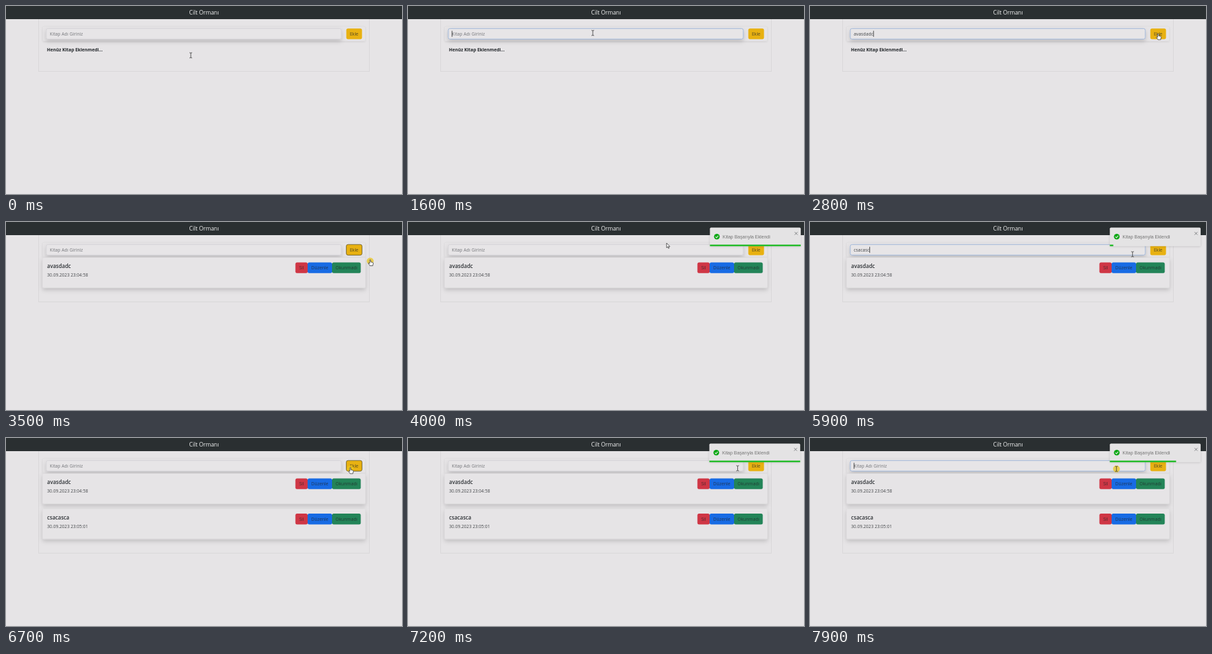
These frames come from a looping animation (600 by 286 pixels, 8000 ms). An HTML page:

```html
<!DOCTYPE html>
<html lang="tr">
<head>
<meta charset="utf-8">
<title>Cilt Ormanı</title>
<style>
  html, body { margin: 0; width: 100%; height: 100%; overflow: hidden; background: #e6e4e6; }
  svg { display: block; width: 600px; height: 286px; }
  text { font: 6.8px "Open Sans", "Noto Sans", sans-serif; fill: #45484b; white-space: pre; }
  .brand { font-size: 8.5px; fill: #f3f3f3; text-anchor: middle; }
  .bold { font-weight: 700; fill: #212529; }
  .name { font-size: 8px; font-weight: 600; fill: #2c3034; }
  .date { font-size: 6.65px; }
  .mid { text-anchor: middle; fill: #212529; fill-opacity: .75; }
  .hint { fill: #75777b; }
  .note { font: 7px "Liberation Sans", Arial, sans-serif; fill: #757575; }
  .frame { fill: none; stroke: #d9d7d9; }
  .panel { fill: #e6e4e6; stroke: #dad8db; stroke-width: .5; }
</style>
</head>
<body>
<svg viewBox="0 0 600 286">
  <defs>
    <filter id="deep" x="-10%" y="-60%" width="120%" height="260%">
      <feDropShadow dx="0" dy="3.4" stdDeviation="3" flood-color="#000" flood-opacity=".17"/>
    </filter>
    <filter id="soft" x="-10%" y="-40%" width="120%" height="190%">
      <feDropShadow dx="0" dy=".9" stdDeviation="1" flood-color="#000" flood-opacity=".09"/>
    </filter>
    <filter id="lift" x="-10%" y="-40%" width="120%" height="190%">
      <feDropShadow dx="0" dy=".5" stdDeviation="1.8" flood-color="#000" flood-opacity=".18"/>
    </filter>
  </defs>
  <rect width="600" height="286" fill="#e6e4e6"/>
  <rect id="box" class="frame" x="49.5" y="10.5" width="501" height="89"/>
  <rect width="600" height="20" fill="#2a2f31"/>
  <text class="brand" x="300" y="13.2">Cilt Ormanı</text>

  <rect class="panel" x="55.3" y="31" width="489.4" height="22.5" rx="2.5" filter="url(#soft)"/>
  <rect id="field" x="61" y="34.3" width="447" height="16" rx="2.6" fill="#e7e5e7" stroke-width=".8" filter="url(#deep)"/>
  <text id="hint" class="hint" x="66.3" y="45">Kitap Adı Giriniz</text>
  <text id="typed" x="66.3" y="45"></text>
  <path id="caret" d="M0 37.7v9.2" stroke="#222" stroke-width=".8"/>
  <rect id="add" x="515.6" y="34.2" width="23.8" height="16.2" rx="2.6" fill="#e8b111"/>
  <text class="mid" x="527.5" y="45">Ekle</text>

  <text id="empty" class="bold" x="62" y="68.6">Henüz Kitap Eklenmedi...</text>
  <g id="cards"></g>

  <g id="toast">
    <rect x="454.3" y="8.5" width="137.6" height="28.2" rx="1.8" fill="#e4e3e4" filter="url(#lift)"/>
    <circle cx="464.8" cy="22.3" r="4.3" fill="#0ca814"/>
    <path d="M462.7 22.4l1.6 1.6 2.7-3.2" fill="none" stroke="#eee" stroke-width="1.1"/>
    <text class="note" x="473.6" y="24.7">Kitap Başarıyla Eklendi</text>
    <path d="M582.7 15.2l4.4 4.4m0-4.4l-4.4 4.4" stroke="#77797b" stroke-width=".9"/>
    <rect id="bar" x="454.3" y="34.5" height="2.2" fill="#10b716"/>
  </g>

  <circle id="halo" r="5.2" fill="#e9c51f" fill-opacity=".75"/>
  <g id="mouse">
    <path id="beam" d="M-2-4Q0-4 0-3Q0-4 2-4M0-3V3M-2 4Q0 4 0 3Q0 4 2 4" fill="none" stroke="#333" stroke-width=".8"/>
    <path id="arrow" d="M0 0V7.2L1.7 5.7L2.8 8.2L3.9 7.7L2.8 5.3H5Z" fill="#fafafa" stroke="#222" stroke-width=".7"/>
    <path id="hand" d="M-.8.6Q0-.4.8.6V3.4L4 4.2Q4.8 4.5 4.6 5.6L3.9 9.2H-.4L-2.8 5.6Q-2.8 4.6-1.8 4.9L-.8 5.8Z" fill="#fafafa" stroke="#222" stroke-width=".7"/>
  </g>
</svg>
<script>
const LOOP = 8000, PX = 0.43;
const $ = id => document.getElementById(id);
const show = (el, on) => el.setAttribute('display', on ? 'inline' : 'none');
const set = (el, attrs) => { for (const k in attrs) el.setAttribute(k, attrs[k]); };
const clamp = v => Math.max(0, Math.min(1, v));
const mix = (a, b, p) => a + (b - a) * p;

function bezier(x1, y1, x2, y2) {
  const at = (a, b, s) => 3 * a * s * (1 - s) ** 2 + 3 * b * s * s * (1 - s) + s ** 3;
  return x => {
    let lo = 0, hi = 1;
    for (let i = 0; i < 24; i++) {
      const m = (lo + hi) / 2;
      if (at(x1, x2, m) < x) lo = m; else hi = m;
    }
    return at(y1, y2, (lo + hi) / 2);
  };
}
const bounce = bezier(.215, .61, .355, 1);
const ease = bezier(.25, .1, .25, 1);
const glide = bezier(.4, 0, .6, 1);

// Value along [position, value] stops, eased inside each segment.
function track(stops, p, curve) {
  const i = stops.findIndex(s => s[0] > p);
  if (i < 0) return stops[stops.length - 1][1];
  if (i === 0) return stops[0][1];
  const [a, b] = [stops[i - 1], stops[i]];
  return mix(a[1], b[1], curve((p - a[0]) / (b[0] - a[0])));
}

const books = [
  { name: 'avasdadc', date: '30.09.2023 23:04:58', at: 3385 },
  { name: 'csacasca', date: '30.09.2023 23:05:01', at: 6640 }
];
const actions = [
  ['Sil', 438.5, 18.5, '#cf3645'],
  ['Düzenle', 457, 37, '#186be4'],
  ['Okunmadı', 494, 43.5, '#238458']
];
const typing = [
  { from: 780, to: 3360, caret: 1600, start: 1900, text: 'avasdadc' },
  { from: 4400, to: 6610, caret: 4400, start: 5300, text: 'csacasca' },
  { from: 7860, to: LOOP, caret: 7860, start: LOOP, text: '' }
];
const toasts = [3515, 6770];
const clicks = [750, 3350, 4380, 6600, 7840];
const ENTER = 640, STAY = 1815, EXIT = 640;

// time, x, y, pointer shape
const path = [
  [0, 280, 75, 'beam'], [450, 280, 75, 'beam'], [780, 280, 41, 'beam'],
  [2150, 280, 41, 'beam'], [2400, 390, 58, 'arrow'], [2700, 527.5, 42, 'hand'],
  [3390, 527.5, 42, 'hand'], [3540, 556, 60, 'arrow'], [3750, 480, 52, 'arrow'],
  [4000, 391.8, 32, 'arrow'], [4250, 400, 42, 'beam'], [4750, 400, 42, 'beam'],
  [5050, 432, 60, 'arrow'], [5400, 452, 69, 'arrow'], [5700, 474, 61, 'arrow'],
  [5900, 488.7, 49, 'beam'], [6150, 506, 62, 'arrow'], [6400, 521.7, 45, 'hand'],
  [6900, 521.7, 45, 'hand'], [7150, 500, 46, 'beam'], [7750, 464.3, 47, 'beam'],
  [LOOP, 464.3, 47, 'beam']
];

$('cards').innerHTML = books.map((b, i) => `
  <g transform="translate(0 ${i * 53.6})">
    <rect class="panel" x="55.3" y="54" width="489.4" height="46" rx="2" filter="url(#deep)"/>
    <text class="name" x="62.3" y="70">${b.name}</text>
    <text class="date" x="62.3" y="83.2">${b.date}</text>
    ${actions.map(([label, x, w, color]) => `
      <rect x="${x}" y="61.5" width="${w}" height="16.3" rx="2.5" fill="${color}"/>
      <text class="mid" x="${x + w / 2}" y="72.2">${label}</text>`).join('')}
  </g>`).join('');
const cards = [...$('cards').children];

function drawField(t) {
  const turn = typing.find(s => t >= s.from && t < s.to);
  const count = turn ? Math.max(0, Math.floor((t - turn.start) / 100) + 1) : 0;
  const text = turn ? turn.text.slice(0, count) : '';
  $('typed').textContent = text;
  show($('hint'), !text);
  $('field').setAttribute('stroke', turn ? '#91aed8' : '#d2d1d5');
  let lit = turn && t >= turn.caret;
  if (lit && !count) lit = (t - turn.caret) % 1000 < 500;
  show($('caret'), lit);
  const end = text ? $('typed').getComputedTextLength() + .4 : .5;
  $('caret').setAttribute('transform', `translate(${66.3 + end} 0)`);
}

function drawToast(t) {
  const life = ENTER + STAY + EXIT;
  const start = toasts.find(s => t >= s && t < s + life);
  show($('toast'), start !== undefined);
  if (start === undefined) return;
  const age = t - start, out = (age - ENTER - STAY) / EXIT;
  let x, alpha;
  if (out < 0) {
    const p = age / ENTER;
    x = track([[0, 3000], [.6, -25], [.75, 10], [.9, -5], [1, 0]], p, bounce);
    alpha = track([[0, 0], [.6, 1]], p, bounce);
  } else {
    x = track([[0, 0], [.2, -20], [1, 2000]], out, ease);
    alpha = track([[.2, 1], [1, 0]], out, ease);
  }
  set($('toast'), { transform: `translate(${x * PX} 0)`, opacity: alpha });
  $('bar').setAttribute('width', 137.6 * (1 - clamp((age - ENTER) / STAY)));
}

function drawMouse(t) {
  const i = path.findIndex(k => k[0] > t), a = path[i - 1], b = path[i];
  const p = glide((t - a[0]) / (b[0] - a[0]));
  const x = mix(a[1], b[1], p), y = mix(a[2], b[2], p);
  $('mouse').setAttribute('transform', `translate(${x} ${y})`);
  for (const id of ['beam', 'arrow', 'hand']) show($(id), id === a[3]);
  set($('halo'), { cx: x, cy: y + (a[3] === 'beam' ? 0 : 2) });
  show($('halo'), clicks.some(c => t >= c && t < c + 180));
}

function draw(t) {
  const shown = books.filter(b => t >= b.at).length;
  cards.forEach((c, i) => show(c, i < shown));
  show($('empty'), !shown);
  $('box').setAttribute('height', shown ? 57.5 + 53.6 * shown : 89);
  const pressed = [3350, 6600].some(c => t >= c && t < c + 200);
  set($('add'), { stroke: pressed ? '#4a421f' : 'none', 'stroke-width': .7 });
  drawField(t);
  drawToast(t);
  drawMouse(t);
}

const began = performance.now();
function tick() {
  draw((performance.now() - began) % LOOP);
  requestAnimationFrame(tick);
}
tick();
</script>
</body>
</html>
```
